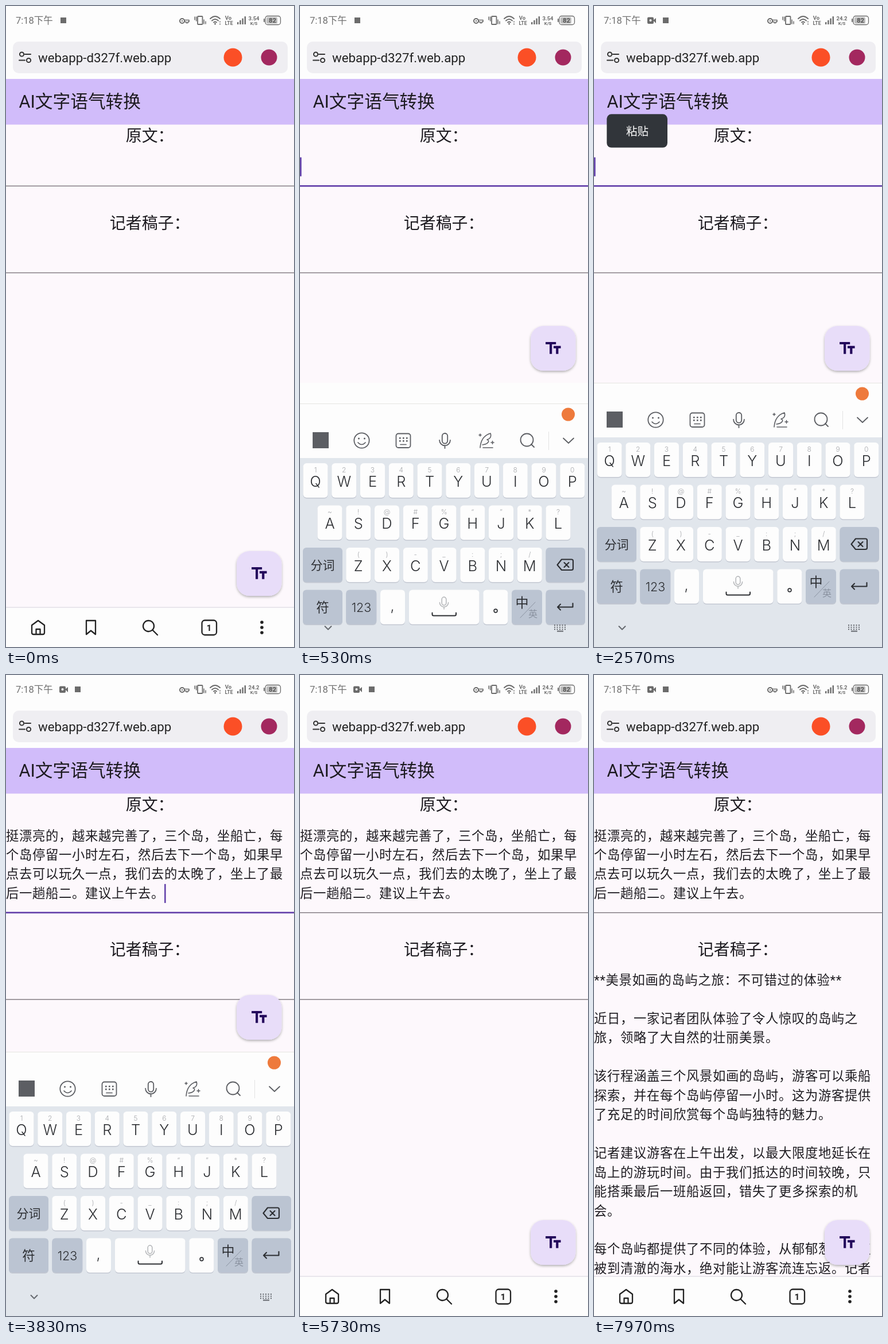
An HTML page for the animation above (8 s loop, 502 by 1116 pixels).

```html
<!DOCTYPE html>
<html lang="zh-CN">
<head>
<meta charset="utf-8">
<style>
  html, body { margin: 0; width: 100%; height: 100%; overflow: hidden; background: #fdfdfd; }
  svg { display: block; width: 100vw; height: 100vh; }
  text { font-family: Roboto, "Noto Sans CJK SC", "Noto Sans CJK", sans-serif; fill: #1d1b20; white-space: pre; }
  #keyboard text { font-family: Inter, "Noto Sans CJK SC", "Noto Sans CJK", sans-serif; font-weight: 350; }
  .body { font-size: 22.3px; letter-spacing: .697px; }
  .heading { font-size: 27.9px; text-anchor: middle; }
  .mid { text-anchor: middle; }
  .line { fill: none; stroke-linecap: round; stroke-linejoin: round; }
</style>
</head>
<body>
<svg id="stage" viewBox="0 0 502 1116"></svg>
<script>
const LOOP = 8000;
const LINE_HEIGHT = 33.46;
const KEYBOARD_HEIGHT = 460;
const FOCUS = 330, OPEN = 350, OPEN_TIME = 317, CAMERA = 900, POPUP = 2200,
      PASTE = 2950, CLOSE = 4560, CLOSE_TIME = 240, REPLY = 7720;

const review = [
  '挺漂亮的，越来越完善了，三个岛，坐船亡，每',
  '个岛停留一小时左石，然后去下一个岛，如果早',
  '点去可以玩久一点，我们去的太晚了，坐上了最',
  '后一趟船二。建议上午去。'
];
const report = [
  '**美景如画的岛屿之旅：不可错过的体验**', '',
  '近日，一家记者团队体验了令人惊叹的岛屿之',
  '旅，领略了大自然的壮丽美景。', '',
  '该行程涵盖三个风景如画的岛屿，游客可以乘船',
  '探索，并在每个岛屿停留一小时。这为游客提供',
  '了充足的时间欣赏每个岛屿独特的魅力。', '',
  '记者建议游客在上午出发，以最大限度地延长在',
  '岛上的游玩时间。由于我们抵达的时间较晚，只',
  '能搭乘最后一班船返回，错失了更多探索的机',
  '会。', '',
  '每个岛屿都提供了不同的体验，从郁郁葱葱的植',
  '被到清澈的海水，绝对能让游客流连忘返。记者'
];

const rect = (x, y, w, h, fill, r = 0, extra = '') =>
  `<rect x="${x}" y="${y}" width="${w}" height="${h}" rx="${r}" fill="${fill}" ${extra}/>`;
const text = (x, y, str, size, fill = '#1d1b20', extra = 'class="mid"') =>
  `<text x="${x}" y="${y}" ${extra} style="font-size:${size}px;fill:${fill}">${str}</text>`;
const path = (d, color = '#222', width = 2.3) =>
  `<path class="line" d="${d}" stroke="${color}" stroke-width="${width}"/>`;
const circle = (x, y, r, fill, extra = '') =>
  `<circle cx="${x}" cy="${y}" r="${r}" fill="${fill}" ${extra}/>`;
const ring = (x, y, r, color, width) => circle(x, y, r, 'none', `stroke="${color}" stroke-width="${width}"`);
const frame = (x, y, w, h, r, color, width) =>
  rect(x, y, w, h, 'none', r, `stroke="${color}" stroke-width="${width}"`);
const group = (id, content) => `<g id="${id}">${content}</g>`;
const paragraph = (lines, y) => lines.map((line, i) =>
  `<text class="body" x="0" y="${y + i * LINE_HEIGHT}">${line}</text>`).join('');

function statusBar() {
  const grey = '#6b6b6b';
  const bars = [0, 1, 2, 3].map(i =>
    rect(403 + i * 4.2, 28 - i * 3.3, 2.4, 4 + i * 3.3, grey, .6)).join('');
  return text(17, 31, '7:18下午', 16.5, '#707070', '')
    + group('camera', rect(93, 19.5, 11, 11.5, grey, 2) + `<path d="M103 25l5-4v9z" fill="${grey}"/>`
      + circle(98.5, 25, 2, '#fdfdfd'))
    + group('notice', rect(95, 20, 10, 10, grey))
    + ring(307, 26, 4, grey, 2) + circle(307, 26, 1.2, grey)
    + path('M311 24.5H319V27.5H317V29.5H314V27.5H311', grey, 1.6)
    + frame(334, 18, 8.5, 14, 1, grey, 1.8) + path('M329 19v5M331.7 19v7M345 24v7M348 27v4', grey, 1.5)
    + path('M356 22q8.5-8 17 0M359 25.5q5.5-5 11 0M362 28.5q2.5-2 5 0', grey, 1.9)
    + circle(364.5, 31, 1.5, grey) + path('M373 27v1M373 31v1', grey, 1.5)
    + text(387.5, 24, 'Vo', 9.5, grey, 'class="mid" font-weight="600"')
    + text(388.5, 33, 'LTE', 8.7, grey, 'class="mid" font-weight="600"')
    + bars
    + `<text id="speed" class="mid" x="432" y="24.5" font-weight="600" style="font-size:9.5px;fill:${grey}"></text>`
    + text(432, 33, 'K/S', 7.7, grey, 'class="mid" font-weight="600"')
    + frame(452, 17.5, 26.5, 15, 4, grey, 1.3) + rect(449, 22, 1.8, 6, grey, .8)
    + rect(454, 19.5, 19, 11, '#bdbdbd', 2)
    + text(464.5, 29.3, '82', 11.5, '#555', 'class="mid" font-weight="600"');
}

function addressBar() {
  return rect(12, 62, 479, 55, '#efeef2', 10)
    + ring(27.5, 84, 3.6, '#333', 2) + path('M33 84H43M23 94.5H33', '#333', 2) + ring(39.5, 94.5, 3.6, '#333', 2)
    + text(56, 97.8, 'webapp-d327f.web.app', 22.3, '#222', '')
    + circle(395.5, 89.5, 16, '#fb4f26') + circle(458.5, 89.5, 14, '#a3285f');
}

function page() {
  return rect(0, 127, 502, 989, '#fdf8fc')
    + rect(0, 127, 502, 79.5, '#d1bcfa')
    + text(22.5, 177, 'AI文字语气转换', 30.7, '#1d1b20', '')
    + '<text class="heading" x="250.6" y="236">原文：</text>'
    + group('review', paragraph(review, 287.5))
    + '<rect id="underline" width="502"/>'
    + '<rect id="cursor" width="2.6" height="33" fill="#6442ab"/>'
    + group('lower', '<text class="heading" x="250.6" y="387.7">记者稿子：</text>'
      + group('emptyLine', rect(0, 463.8, 502, 1.4, '#7c767c')))
    + group('report', paragraph(report, 539))
    + group('popup', rect(22.3, 188.3, 105.7, 58.3, '#31353a', 8)
      + text(75.5, 225, '粘贴', 19.5, '#fff'));
}

function browserNav() {
  return rect(0, 1046, 502, 2, '#e9e6ec') + rect(0, 1048, 502, 68, '#fdfdfd')
    + path('M45 1078L56 1070L67 1078V1091Q67 1094 64 1094H48Q45 1094 45 1091ZM52.5 1094V1085H59.5V1094')
    + path('M140 1070H156V1094L148 1087.5L140 1094Z')
    + ring(248.5, 1079.5, 9.5, '#222', 2.3) + path('M255.5 1086.5L264 1095')
    + frame(341.5, 1069.5, 25.5, 25.5, 5, '#222', 2.3)
    + text(354, 1088, '1', 15.5, '#222', 'class="mid" font-weight="700"')
    + [1073, 1082, 1091].map(y => circle(446, y, 2.8, '#222')).join('');
}

function keyboard() {
  const ink = '#5c5e63', dark = '#2c2e32';
  const key = (x, y, w, fill = '#fdfdfd') => rect(x, y + 1.5, w, 60, '#c3c8d2', 6) + rect(x, y, w, 60, fill, 6);
  const row = (letters, hints, x, y) => [...letters].map((letter, i) => {
    const left = x + i * 49.75;
    return key(left, y, 43) + text(left + 21.5, y + 40.5, letter, 25.5, dark)
      + text(left + 21.5, y + 15.5, hints[i], 12, '#a5a7ab');
  }).join('');
  const special = (x, y, w) => key(x, y, w, '#bbc4d2');
  const mic = (x, y, s, color, width) => path(`M${x - 4 * s} ${y - 7 * s}a${4 * s} ${4 * s} 0 0 1 ${8 * s} 0v${7 * s}
    a${4 * s} ${4 * s} 0 0 1 ${-8 * s} 0zM${x - 8 * s} ${y - s}a${8 * s} ${8 * s} 0 0 0 ${16 * s} 0M${x} ${y + 7 * s}v${4 * s}`, color, width);
  const dots = [0, 1, 2].map(i => rect(173 + i * 6, 715, 2.6, 2.6, ink) + rect(173 + i * 6, 720, 2.6, 2.6, ink)).join('');

  return rect(0, 656, 502, 95, '#fdfdfd') + rect(0, 656, 502, 1, '#e6e6e2')
    + rect(0, 751, 502, 900, '#e1e6ec')
    + circle(467.5, 675, 11.5, '#ee7a3c')
    + rect(22, 706, 28, 28, ink)
    + ring(107.5, 720.5, 13.2, ink, 1.8) + circle(102.5, 717, 1.5, ink) + circle(112.5, 717, 1.5, ink)
    + path('M101 724q6.5 7 13 0', ink, 1.7)
    + frame(167.5, 708.5, 25, 24.5, 4, ink, 1.8) + dots + path('M175 727.5h10', ink, 1.7)
    + mic(252.5, 721, 1.18, ink, 1.8)
    + path('M314 733C315 719 322 711 332 708C334 714 331 718 326 719C331 720 329 727 318 728M319 733H336M312 711h4M314 709v4M333 724h5M335.5 721.5v5', ink, 1.6)
    + ring(395.5, 719.5, 11, ink, 1.8) + path('M403 727L408 732', ink, 1.8)
    + rect(433, 705, 1, 32, '#e2e2e2')
    + path('M459 716.5L468 725L477 716.5', ink, 1.8)
    + row('QWERTYUIOP', '1234567890', 5.5, 760)
    + row('ASDFGHJKL', '~!@#%“”*?', 30.5, 833.5)
    + row('ZXCVBNM', '()-_:;/', 80.3, 907)
    + special(5, 907, 69) + text(39.5, 945, '分词', 21, dark)
    + special(428.5, 907, 68.5)
    + path('M456 927.5H473Q476 927.5 476 930V943.5Q476 946 473 946H456L448.5 937ZM460.5 933L468.5 941M468.5 933L460.5 941', dark, 2.1)
    + special(5, 980.5, 69) + text(39.5, 1018.5, '符', 22.5, dark)
    + special(80.3, 980.5, 53) + text(107, 1018.5, '123', 21.5, dark)
    + key(140, 980.5, 43) + text(161, 1017, ',', 25, dark)
    + key(190, 980.5, 122.5) + mic(251, 1003.5, .95, '#b3b5b8', 1.5)
    + path('M230.5 1020.5V1023Q230.5 1025.5 233 1025.5H269.5Q272 1025.5 272 1023V1020.5', dark, 2)
    + key(319.3, 980.5, 43) + ring(341, 1017, 2.9, dark, 1.6)
    + special(369, 980.5, 53) + text(387, 1010.5, '中', 23, dark)
    + path('M384 1029L410 1002', '#8c94a2', 1) + text(406, 1028, '英', 16, '#8a92a0')
    + special(428.5, 980.5, 68.5) + path('M475.5 1004V1010.5H449M454 1005.5L449 1010.5L454 1015.5', dark, 2.1);
}

function systemKeys() {
  const grey = '#64686e';
  const dots = Array.from({ length: 15 }, (_, i) =>
    rect(443 + i % 5 * 4.5, 1077 + Math.floor(i / 5) * 3.6, 2, 2, grey)).join('');
  return path('M43.5 1080L49 1085.5L54.5 1080', grey, 2) + dots + rect(448, 1087.5, 11, 2, grey);
}

const fab = rect(402, 949, 78.5, 78, '#e8ddf9', 22.3, 'filter="url(#shadow)"')
  + '<path transform="translate(424.6 971.3) scale(1.394)" d="M2.5 4v3h5v12h3V7h5V4zm19 5h-9v3h3v7h3v-7h3z" fill="#24085c"/>';

const stage = document.getElementById('stage');
stage.innerHTML = `<defs><filter id="shadow" x="-20%" y="-20%" width="140%" height="150%">
    <feDropShadow dx="0" dy="2" stdDeviation="2" flood-color="#000" flood-opacity=".3"/></filter></defs>`
  + rect(0, 0, 502, 1116, '#fdfdfd') + statusBar() + addressBar() + page()
  + group('blank', rect(0, 656, 502, 460, '#fdfdfd'))
  + group('fab', fab) + group('nav', browserNav())
  + group('keyboard', keyboard()) + group('systemKeys', systemKeys());

const part = {};
stage.querySelectorAll('[id]').forEach(el => part[el.id] = el);
const show = (name, visible) => part[name].setAttribute('display', visible ? 'inline' : 'none');
const move = (name, x, y) => part[name].setAttribute('transform', `translate(${x} ${y})`);
const clamp = v => Math.min(1, Math.max(0, v));
const set = (el, attrs) => Object.entries(attrs).forEach(([k, v]) => el.setAttribute(k, v));

function render(t) {
  const focused = t >= FOCUS && t < CLOSE;
  const resized = t >= OPEN && t < CLOSE + CLOSE_TIME;
  const pasted = t >= PASTE;
  const replied = t >= REPLY;
  const shift = pasted ? LINE_HEIGHT * 3 : 0;

  show('camera', t >= CAMERA);
  move('notice', t >= CAMERA ? 25 : 0, 0);
  part.speed.textContent = t < 2100 ? '3.54' : t < 6500 ? '24.2' : '15.2';

  show('review', pasted);
  set(part.underline, focused
    ? { y: 312 + shift, height: 2.7, fill: '#6442ab' }
    : { y: 312.7 + shift, height: 1.4, fill: '#7c767c' });
  show('cursor', focused && Math.floor((t - FOCUS - 60) / 500) % 2 === 0);
  set(part.cursor, { x: pasted ? 276 : 0, y: 263.5 + shift });
  move('lower', 0, shift);
  show('emptyLine', !replied);
  show('report', replied);
  show('popup', t >= POPUP && t < PASTE);
  part.popup.setAttribute('opacity', clamp((t - POPUP) / 120));

  const hidden = t < CLOSE
    ? (1 - clamp((t - OPEN) / OPEN_TIME)) ** 3
    : clamp((t - CLOSE) / CLOSE_TIME) ** 2;
  move('keyboard', 0, Math.round(hidden * KEYBOARD_HEIGHT));
  show('keyboard', resized);
  show('systemKeys', resized);
  show('blank', resized);
  show('nav', !resized);
  move('fab', 0, resized ? -392 : 0);
}

function tick(now) {
  render(now % LOOP);
  requestAnimationFrame(tick);
}
render(0);
requestAnimationFrame(tick);
</script>
</body>
</html>
```
